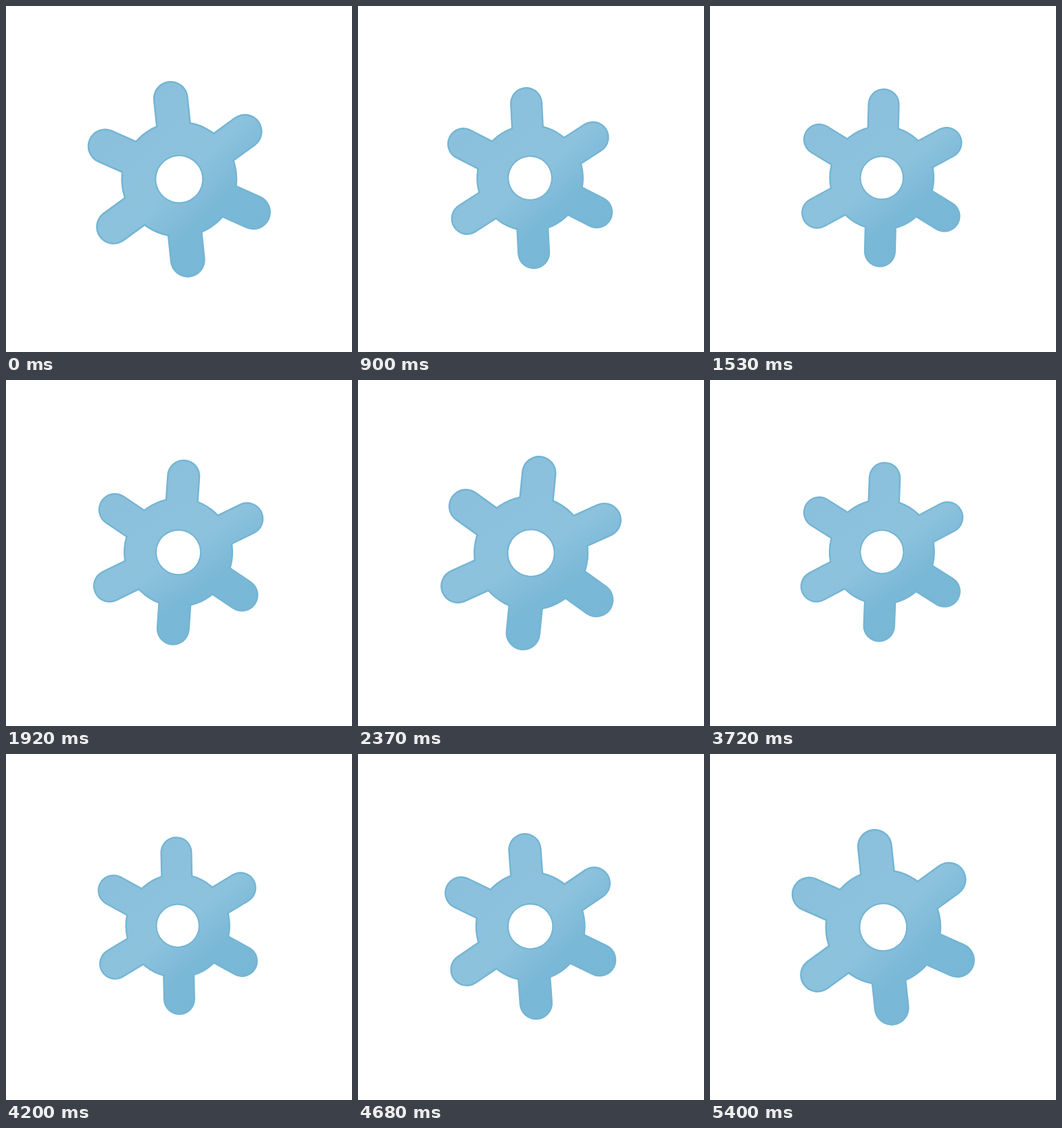
Write an HTML page with a canvas that moves like this. It is 512x512 px and loops after 5.43 s.

```html
<!DOCTYPE html>
<html lang="en">
<head>
<meta charset="utf-8">
<title>Swaying gear</title>
<style>
  html, body { margin: 0; width: 100%; height: 100%; overflow: hidden; background: #fff; }
  canvas { display: block; }
</style>
</head>
<body>
<canvas id="stage" width="512" height="512"></canvas>
<script>
const ctx = document.getElementById('stage').getContext('2d');
const LOOP = 5430, HALF = LOOP / 2, SWING = 2640;
const TILT = 6 * Math.PI / 180;
const EDGE = '#74b5d4', RIM = 2.6;

const fill = ctx.createLinearGradient(-80, -100, 80, 100);
fill.addColorStop(0, '#8bc0dc');
fill.addColorStop(0.5, '#8dc2dd');
fill.addColorStop(0.77, '#79b8d6');
fill.addColorStop(1, '#78b7d5');

function disc(radius, color) {
  ctx.beginPath();
  ctx.arc(0, 0, radius, 0, 2 * Math.PI);
  ctx.fillStyle = color;
  ctx.fill();
}

// Body plus six round-ended arms, shrunk inwards by inset.
function gear(inset, color) {
  disc(86 - inset, color);
  ctx.beginPath();
  for (let i = 0; i < 6; i++) {
    const a = i * Math.PI / 3;
    ctx.moveTo(0, 0);
    ctx.lineTo(120 * Math.sin(a), -120 * Math.cos(a));
  }
  ctx.lineWidth = 52 - 2 * inset;
  ctx.lineCap = ctx.lineJoin = 'round';
  ctx.strokeStyle = color;
  ctx.stroke();
}

function draw(now) {
  const t = now % LOOP;
  const phase = Math.PI * Math.min(1, (t % HALF) / SWING);
  const angle = TILT * Math.cos(phase) * (t < HALF ? -1 : 1);
  const scale = 1 - 0.1 * Math.sin(phase) ** 2;
  const center = 256.3 - 22 * (1 - scale);

  ctx.resetTransform();
  ctx.fillStyle = '#fff';
  ctx.fillRect(0, 0, 512, 512);
  ctx.translate(center, center);
  ctx.rotate(angle);
  ctx.scale(scale, scale);
  gear(0, EDGE);
  gear(RIM, fill);
  disc(36.3, EDGE);
  disc(34, '#fff');
}

const start = performance.now();
function tick() {
  draw(performance.now() - start);
  requestAnimationFrame(tick);
}
tick();
</script>
</body>
</html>
```
